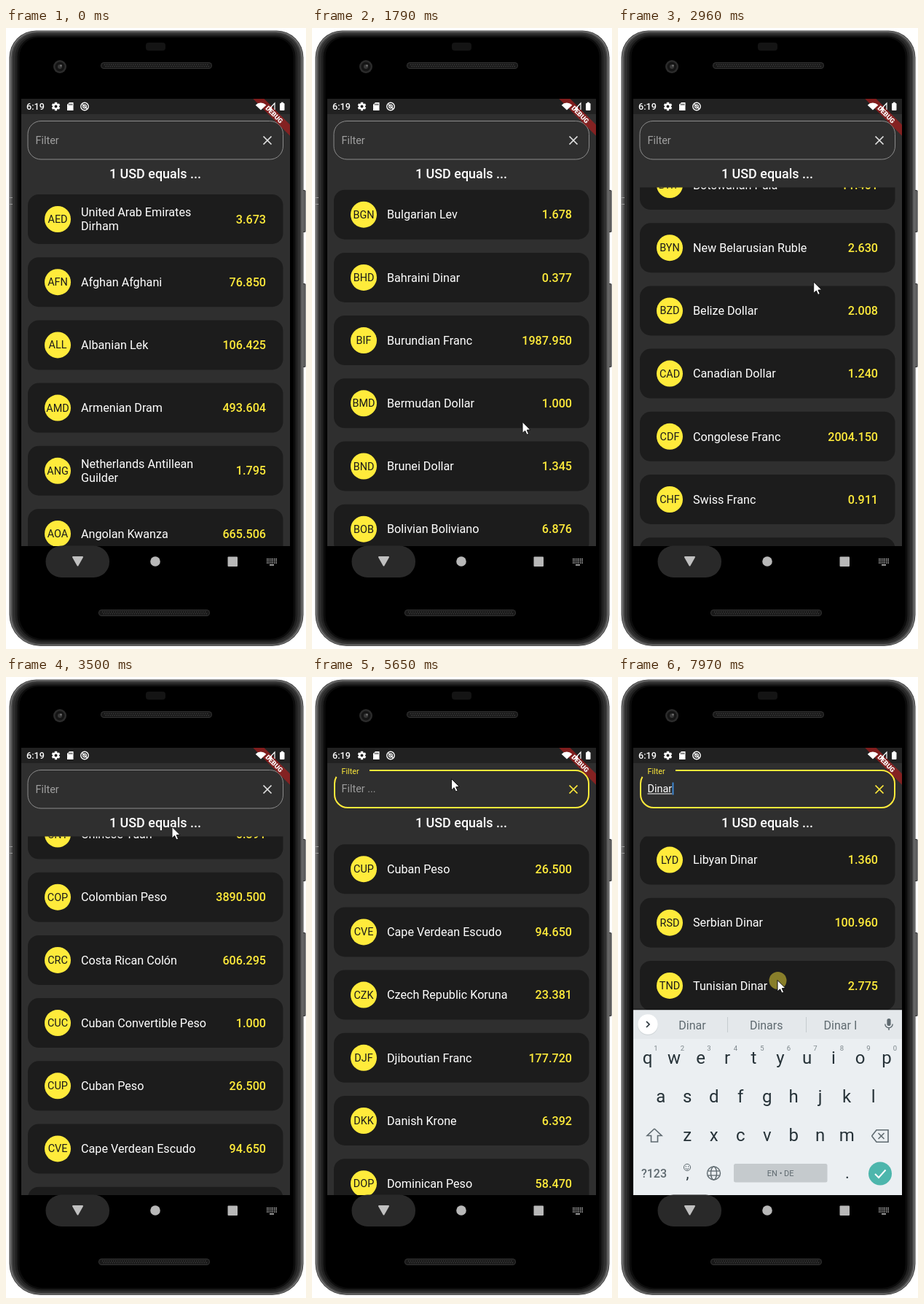
Recreate the animation shown at these times as an HTML page with a canvas. Size 412 by 851 pixels, loop 8000 ms.

```html
<!DOCTYPE html>
<html lang="en">
<head>
<meta charset="utf-8">
<title>Currency list</title>
<style>
html, body { margin: 0; width: 100%; height: 100%; overflow: hidden; background: #fff; }
canvas { display: block; width: 412px; height: 851px; }
</style>
</head>
<body>
<canvas id="stage"></canvas>
<script>
const W = 412, H = 851, LOOP = 8000, PITCH = 86.19;
const YELLOW = '#ffeb3b', PANEL = '#2f2f2f', CARD = '#1c1c1c';
const canvas = document.getElementById('stage');
const c = canvas.getContext('2d');
const dpr = window.devicePixelRatio || 1;
canvas.width = W * dpr;
canvas.height = H * dpr;

const parse = text => text.trim().split('\n').map(line => {
  const [code, name, rate] = line.split(';');
  return { code, name: name.split('|'), rate };
});

const currencies = parse(`
AED;United Arab Emirates|Dirham;3.673
AFN;Afghan Afghani;76.850
ALL;Albanian Lek;106.425
AMD;Armenian Dram;493.604
ANG;Netherlands Antillean|Guilder;1.795
AOA;Angolan Kwanza;665.506
ARS;Argentine Peso;96.045
AUD;Australian Dollar;1.344
AWG;Aruban Florin;1.800
AZN;Azerbaijani Manat;1.704
BAM;Bosnia-Herzegovina|Convertible Mark;1.675
BBD;Barbadian Dollar;2.019
BDT;Bangladeshi Taka;84.862
BGN;Bulgarian Lev;1.678
BHD;Bahraini Dinar;0.377
BIF;Burundian Franc;1987.950
BMD;Bermudan Dollar;1.000
BND;Brunei Dollar;1.345
BOB;Bolivian Boliviano;6.876
BRL;Brazilian Real;5.743
BSD;Bahamian Dollar;1.000
BTC;Bitcoin;0.000
BTN;Bhutanese Ngultrum;74.541
BWP;Botswanan Pula;11.401
BYN;New Belarusian Ruble;2.630
BZD;Belize Dollar;2.008
CAD;Canadian Dollar;1.240
CDF;Congolese Franc;2004.150
CHF;Swiss Franc;0.911
CLF;Chilean Unit of|Account (UF);0.029
CLP;Chilean Peso;812.300
CNH;Chinese Yuan|(Offshore);6.394
CNY;Chinese Yuan;6.391
COP;Colombian Peso;3890.500
CRC;Costa Rican Colón;606.295
CUC;Cuban Convertible Peso;1.000
CUP;Cuban Peso;26.500
CVE;Cape Verdean Escudo;94.650
CZK;Czech Republic Koruna;23.381
DJF;Djiboutian Franc;177.720
DKK;Danish Krone;6.392
DOP;Dominican Peso;58.470
DZD;Algerian Dinar;137.225
EGP;Egyptian Pound;15.708`);

const listDinar = parse(`
BHD;Bahraini Dinar;0.377
DZD;Algerian Dinar;137.225
IQD;Iraqi Dinar;1459.000
JOD;Jordanian Dinar;0.709
KWD;Kuwaiti Dinar;0.302
LYD;Libyan Dinar;1.360
RSD;Serbian Dinar;100.960
TND;Tunisian Dinar;2.775`);
const [libya, serbia, tunis] = listDinar.slice(5);
const [saudi, liberia, morocco, moldova] = parse(`
SAR;Saudi Riyal;3.751
LRD;Liberian Dollar;148.500
MAD;Moroccan Dirham;9.072
MDL;Moldovan Leu;17.480`);
// Only the rows that come into view are filled in
const listD = [...Array(36).fill(null), liberia, libya, morocco, moldova];
const listDi = [...Array(4).fill(null), libya, serbia, saudi, tunis];

// Keyframes: time, value...
const scrollKeys = [[690, 0], [980, 180], [1130, 180], [1380, 701], [1650, 1052], [1930, 1183],
  [2150, 1273], [2410, 1652.6], [2720, 1964], [2820, 1964], [3150, 2225], [3500, 2803.3],
  [3650, 2956], [4060, 3078.6], [4450, 3101.6]];
const pointerKeys = [[20, 372, 852], [340, 311, 631], [690, 311, 631], [980, 302, 470], [1130, 302, 470],
  [1380, 287, 357], [1930, 290, 575], [2130, 290, 575], [2410, 285, 235], [2720, 285, 225],
  [2820, 285, 225], [3150, 240, 540], [3500, 228.5, 206], [3620, 226, 196], [4060, 218, 401],
  [4450, 203, 219], [4720, 184, 130], [4930, 192, 140], [7500, 192, 140], [7840, 219, 405], [7970, 219.5, 416]];

const clamp = (v, a = 0, b = 1) => Math.min(b, Math.max(a, v));
const mix = (a, b, k) => a + (b - a) * k;
const ease = k => { k = clamp(k); return k * k * (3 - 2 * k); };

// Monotone cubic curve through the keys
function track(keys, t, col = 1) {
  const last = keys.length - 1;
  if (t <= keys[0][0]) return keys[0][col];
  if (t >= keys[last][0]) return keys[last][col];
  let i = 0;
  while (t > keys[i + 1][0]) i++;
  const slope = j => (keys[j + 1][col] - keys[j][col]) / (keys[j + 1][0] - keys[j][0]);
  const tangent = j => {
    if (j === 0 || j === last) return 0;
    const a = slope(j - 1), b = slope(j);
    return a * b <= 0 ? 0 : 2 * a * b / (a + b);
  };
  const span = keys[i + 1][0] - keys[i][0], k = (t - keys[i][0]) / span, q = 1 - k;
  return keys[i][col] * (1 + 2 * k) * q * q + tangent(i) * span * k * q * q
    + keys[i + 1][col] * k * k * (3 - 2 * k) - tangent(i + 1) * span * k * k * q;
}

function box(x, y, w, h, r, fill) {
  c.beginPath();
  c.roundRect(x, y, w, h, r);
  c.fillStyle = fill;
  c.fill();
}
function dot(x, y, r, fill) {
  c.beginPath();
  c.arc(x, y, r, 0, 7);
  c.fillStyle = fill;
  c.fill();
}
function ring(x, y, r, color, width = 1) {
  c.beginPath();
  c.arc(x, y, r, 0, 7);
  c.strokeStyle = color;
  c.lineWidth = width;
  c.stroke();
}
function line(points, color, width = 1, fill) {
  c.beginPath();
  points.forEach(([x, y], i) => i ? c.lineTo(x, y) : c.moveTo(x, y));
  if (fill) { c.closePath(); c.fillStyle = fill; c.fill(); }
  if (color) { c.strokeStyle = color; c.lineWidth = width; c.stroke(); }
}
function label(str, x, y, size, color, align = 'left', weight = 400) {
  c.font = `${weight} ${size}px Roboto, "Open Sans", sans-serif`;
  c.textAlign = align;
  c.fillStyle = color;
  c.fillText(str, x, y);
}

function speaker(x, y) {
  box(x, y, 153, 9, 4.5, '#333');
  box(x + 1, y + 1, 151, 7, 3.5, '#191919');
  for (let i = 0; i < 48; i++) {
    c.fillStyle = '#3d3d3d';
    c.fillRect(x + 5 + i * 3, y + 2.5, 1.4, 1.4);
    c.fillRect(x + 6.5 + i * 3, y + 5, 1.4, 1.4);
  }
}

function phone() {
  c.fillStyle = '#fff';
  c.fillRect(0, 0, W, H);
  for (const [y, h] of [[222, 58], [350, 115]]) {
    box(405, y, 6.5, h, 1.5, '#3a3a3a');
    box(406, y + 1, 4, h - 2, 1, '#777');
  }
  box(404, 584, 4, 40, 1, '#444');
  const rims = [[0, '#3c3c3c'], [1, '#787878'], [2.5, '#4a4a4a'], [4.5, '#303030'], [8, '#202020'], [11, '#0c0c0c'], [14, '#000']];
  for (const [d, color] of rims) {
    const v = d * .7, top = 37 - d * .8, low = 43 - d * .8;
    box(4.5 + d, 3.5 + v, 404 - 2 * d, 843.5 - 2 * v, [top, top, low, low], color);
  }
  c.fillStyle = '#999';
  c.fillRect(4, 232, 5, 1);
  c.fillRect(4, 241, 5, 1);
  box(192, 20, 27, 11, 4, '#141414');
  dot(74, 53, 9, '#2c2c2c');
  dot(74, 53, 6.5, '#151515');
  dot(74, 53, 3, '#383838');
  dot(75.5, 51.5, 1.2, '#777');
  speaker(130, 47);
  speaker(127, 797);
}

function navBar() {
  c.fillStyle = '#000';
  c.fillRect(21, 710, 369, 45);
  box(54.5, 709.5, 87.5, 43.5, 21.5, '#292929');
  c.lineJoin = 'round';
  line([[92, 725], [105, 725], [98.5, 736.5], [92, 725]], '#c0c0c0', 2, '#c0c0c0');
  c.lineJoin = 'miter';
  dot(205, 731, 6.8, '#b8b8b8');
  box(304.5, 724.5, 13.5, 13.5, 1, '#b8b8b8');
  for (let r = 0; r < 3; r++)
    for (let i = 0; i < 6; i++) c.fillRect(358 + i * 2.5, 727 + r * 2.6, 1.5, 1.5);
  c.fillRect(362, 735, 6, 1.6);
}

function statusBar() {
  c.fillStyle = '#212121';
  c.fillRect(21, 97, 369, 21);
  label('6:19', 28, 112, 12.6, '#fff', 'left', 500);
  // gear
  c.save();
  c.translate(68.5, 107.5);
  for (let i = 0; i < 6; i++) {
    c.rotate(Math.PI / 3);
    box(-1.6, -5.8, 3.2, 3, .5, '#fff');
  }
  c.restore();
  ring(68.5, 107.5, 3.2, '#fff', 2.4);
  line([[87, 102], [92.5, 102], [92.5, 113], [84, 113], [84, 105]], null, 0, '#fff');
  c.fillStyle = '#212121';
  for (let i = 0; i < 3; i++) c.fillRect(86.2 + i * 1.9, 103.6, 1, 2.3);
  ring(108, 107.5, 5.2, '#fff', 1.4);
  ring(108, 107.5, 2.4, '#fff', 1.2);
  line([[105, 104.5], [111.5, 111]], '#fff', 1.3);
}

function banner() {
  c.save();
  c.beginPath();
  c.rect(21, 97, 369, 613);
  c.clip();
  c.translate(390, 97);
  c.rotate(Math.PI / 4);
  c.fillStyle = 'rgba(183,28,28,.63)';
  c.fillRect(-36, 25.1, 72, 10.8);
  label('DEBUG', 0, 33.8, 9.2, '#fff', 'center', 900);
  c.restore();
  c.beginPath();
  c.moveTo(350, 112.5);
  c.arc(350, 112.5, 10, -Math.PI * .76, -Math.PI * .24);
  c.closePath();
  c.fillStyle = '#fff';
  c.fill();
  line([[360.5, 112], [369, 103], [369, 112]], '#fff', 1.2);
  line([[360, 112.5], [365, 107.5], [365, 112.5]], null, 0, '#fff');
  box(376, 103, 6.5, 10, 1, '#fff');
  c.fillRect(377.8, 101.7, 3, 2);
}

function field(t, typed) {
  const k = ease((t - 5370) / 240), on = t >= 5370;
  c.strokeStyle = on ? YELLOW : '#8c8c8c';
  c.lineWidth = on ? 2 : 1;
  c.beginPath();
  if (on) {
    const gap = mix(48, 79, k), a = mix(1.5, 1.17, k) * Math.PI;
    c.moveTo(gap, 128);
    c.arcTo(380, 128, 380, 146, 18);
    c.arcTo(380, 179, 362, 179, 18);
    c.arcTo(31, 179, 31, 161, 18);
    c.lineTo(31, 146);
    c.arc(49, 146, 18, Math.PI, a);
  } else {
    c.roundRect(30, 127.5, 350.5, 52.5, 18);
  }
  c.stroke();
  const grey = [160, 160, 160], yel = [255, 235, 59];
  const tint = grey.map((v, i) => Math.round(mix(v, yel[i], k)));
  label('Filter', 40.5, mix(159, 133, k), mix(14.4, 10.8, k), `rgb(${tint})`);
  if (on && !typed) {
    c.globalAlpha = clamp(k * 2 - 1);
    label('Filter ...', 40.5, 158, 14.4, '#9c9c9c');
    c.globalAlpha = 1;
  }
  if (typed) {
    label(typed, 40.5, 158, 14.4, '#fff');
    const w = c.measureText(typed).width;
    c.fillRect(40.5, 159.5, w, 1);
    if (t < 7300 || t >= 7800) {
      c.fillStyle = '#3f8fe0';
      c.fillRect(40.5 + w + .5, 144.5, 1.8, 17);
    }
  }
  const x = on ? YELLOW : '#e0e0e0';
  line([[353.5, 148.5], [364.5, 159.5]], x, 1.7);
  line([[364.5, 148.5], [353.5, 159.5]], x, 1.7);
}

function list(items, scroll, bottom) {
  c.save();
  c.beginPath();
  c.rect(21, 218.5, 369, bottom - 218.5);
  c.clip();
  items.forEach((item, i) => {
    const y = 262 + i * PITCH - scroll;
    if (!item || y < 180 || y > 750) return;
    box(30, y - 34, 350.5, 68, 15, CARD);
    dot(71, y, 18, YELLOW);
    label(item.code, 71, y + 5, 14.4, '#1a1a1a', 'center');
    item.name.forEach((str, n) => {
      label(str, 103, y + 5.7 + (n - (item.name.length - 1) / 2) * 18.8, 16.16, '#fff');
    });
    label(item.rate, 357, y + 5.7, 16.16, YELLOW, 'right', 500);
  });
  c.restore();
}

function keyboard(t, typed) {
  const shift = 300 * (1 - ease((t - 6070) / 320));
  if (shift >= 254) return;
  const ink = '#263238', soft = '#5f6a70';
  c.save();
  c.beginPath();
  c.rect(21, 440, 369, 270);
  c.clip();
  c.translate(0, shift);
  c.fillStyle = 'rgba(0,0,0,.25)';
  c.fillRect(21, 454.5, 369, 2);
  c.fillStyle = '#ebeff2';
  c.fillRect(21, 456.5, 369, 254);
  c.fillStyle = '#e4e8eb';
  c.fillRect(21, 456.5, 369, 39.5);
  dot(41, 477, 14, '#d3d8db');
  dot(41, 476, 13.7, '#fff');
  line([[39, 472], [43, 476], [39, 480]], ink, 1.7);
  if (t >= 6690) {
    const words = typed === 'Dinar' ? ['Dinar', 'Dinars', 'Dinar I'] : [typed, 'Dinner', 'Did'];
    words.forEach((w, i) => label(w, 102 + i * 101.7, 482.5, 16, soft, 'center'));
    c.fillStyle = '#c6cccf';
    c.fillRect(150, 466, 1, 21);
    c.fillRect(258, 466, 1, 21);
  }
  box(369.4, 468, 5.2, 10, 2.6, soft);
  c.beginPath();
  c.arc(372, 475.5, 5.2, 0, Math.PI);
  c.strokeStyle = soft;
  c.lineWidth = 1.4;
  c.stroke();
  line([[372, 480.5], [372, 484]], soft, 1.5);

  [['qwertyuiop', 40.5, 529.5], ['asdfghjkl', 58.7, 582.5], ['zxcvbnm', 95.2, 635.5]].forEach(([keys, x, y], r) => {
    [...keys].forEach((ch, i) => {
      label(ch, x + i * 36.5, y, 24, ink, 'center');
      if (!r) label(String((i + 1) % 10), x + 11.5 + i * 36.5, 512, 9.5, '#7b858a', 'center');
    });
  });
  // shift and backspace
  line([[50, 619], [60, 628.5], [54.5, 628.5], [54.5, 637], [45.5, 637], [45.5, 628.5], [40, 628.5], [50, 619]], soft, 1.6);
  line([[348.5, 629], [355, 620.8], [371, 620.8], [371, 637.2], [355, 637.2], [348.5, 629]], soft, 1.6);
  line([[357.5, 625], [365.5, 633]], soft, 1.6);
  line([[365.5, 625], [357.5, 633]], soft, 1.6);

  label('?123', 49.5, 685.5, 16, soft, 'center', 500);
  ring(95, 672, 4.6, soft, 1);
  dot(93.3, 670.8, .8, soft);
  dot(96.7, 670.8, .8, soft);
  c.beginPath();
  c.arc(95, 672.2, 2.4, .3, 2.84);
  c.strokeStyle = soft;
  c.stroke();
  label(',', 95.5, 687, 20, ink, 'center');
  ring(131.5, 680, 9, soft, 1.4);
  c.beginPath();
  c.ellipse(131.5, 680, 4, 9, 0, 0, 7);
  c.stroke();
  line([[123.5, 677], [139.5, 677]], soft, 1.3);
  line([[123.5, 683], [139.5, 683]], soft, 1.3);
  box(159, 667, 128.5, 25.5, 2.5, '#c5cacd');
  label('EN • DE', 223.2, 684, 11, soft, 'center');
  label('.', 315, 687, 22, ink, 'center');
  dot(360, 680.5, 16, '#4db6ac');
  line([[353, 681], [358, 686], [367.5, 675.5]], '#fff', 2);
  c.restore();
}

function pointer(t) {
  if (t < 20) return;
  const x = track(pointerKeys, t), y = track(pointerKeys, t, 2);
  if (t >= 7860) dot(x, y, 12 * ease((t - 7840) / 100), 'rgba(255,235,59,.48)');
  const shape = [[0, 0], [0, 15.5], [3.6, 12.2], [6, 17.6], [8.6, 16.4], [6.2, 11.2], [11, 11]];
  line(shape.concat([shape[0]]).map(([a, b]) => [x + a - .5, y + b - .5]), '#111', 1, '#fff');
}

function stateAt(t) {
  if (t < 6530) return ['', currencies, track(scrollKeys, t)];
  if (t < 6690) return ['D', listD, 3101.6];
  if (t < 6780) return ['Di', listDi, 451.6];
  const pull = 9.2 * ease((t - 7870) / 95);
  return [t < 6870 ? 'Din' : 'Dinar', listDinar, 451.6 - pull];
}

function draw(t) {
  const [typed, items, scroll] = stateAt(t);
  c.setTransform(dpr, 0, 0, dpr, 0, 0);
  phone();
  c.fillStyle = PANEL;
  c.fillRect(21, 97, 369, 613);
  statusBar();
  list(items, scroll, t >= 6390 ? 456.5 : 710);
  field(t, typed);
  label('1 USD equals ...', 205, 206, 17.96, '#fff', 'center', 500);
  banner();
  keyboard(t, typed);
  navBar();
  pointer(t);
}

const start = performance.now();
function frame() {
  draw((performance.now() - start) % LOOP);
  requestAnimationFrame(frame);
}
frame();
</script>
</body>
</html>
```
